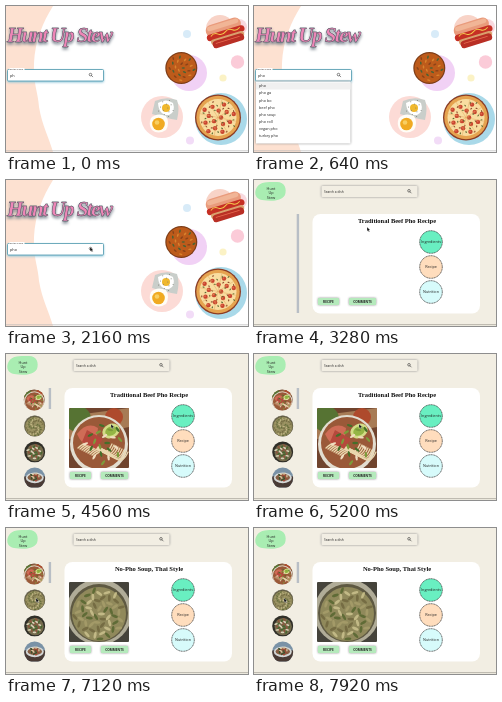
Write an HTML page that moves like this. It is 242 px wide and 146 px high and loops after 8000 ms.

```html
<!DOCTYPE html>
<html lang="en">
<head>
<meta charset="utf-8">
<title>Recipe finder</title>
<style>
html, body { margin: 0; height: 100%; overflow: hidden; background: #fff; }
svg { display: block; width: 100vw; height: 100vh; }
text { font-family: "Open Sans", Arial, sans-serif; font-size: 3.8px; fill: #222; }
.mid { text-anchor: middle; }
.brand {
  font: italic bold 21px "Liberation Serif", serif; letter-spacing: -1.5px;
  fill: #ee86b7; stroke: #555b66; stroke-width: .35px;
  filter: drop-shadow(.6px .9px 0 #59606b) drop-shadow(.6px 2px 1.4px #77808c);
}
.heading { font: bold 6.5px "Liberation Serif", serif; fill: #111; }
.soft { filter: drop-shadow(0 .8px 1px #8a8a8a); }
.glow { filter: drop-shadow(0 1px 1.2px #8cc5d8); }
.tiny { font-size: 3.2px; }
</style>
</head>
<body>
<svg id="stage" viewBox="0 0 242 146" preserveAspectRatio="none"></svg>
<script>
const LOOP = 8000;
const OPEN_RECIPE = 2480, LOGO_TEXT = 3040, PHOTOS = 4000, NEXT_DISH = 7000;

const circle = (x, y, r, fill, more = '') =>
  `<circle cx="${x}" cy="${y}" r="${r}" fill="${fill}" ${more}/>`;
const rect = (x, y, w, h, fill, more = '') =>
  `<rect x="${x}" y="${y}" width="${w}" height="${h}" fill="${fill}" ${more}/>`;
const path = (d, fill, more = '') => `<path d="${d}" fill="${fill}" ${more}/>`;
const line = (d, color, width) =>
  path(d, 'none', `stroke="${color}" stroke-width="${width}" stroke-linecap="round"`);
const text = (x, y, s, more = '') => `<text x="${x}" y="${y}" ${more}>${s}</text>`;
const group = (body, more = '') => `<g ${more}>${body}</g>`;
const repeat = (n, f) => Array.from({ length: n }, (_, i) => f(i)).join('');
const lens = (x, y) =>
  circle(x, y, 1.3, 'none', 'stroke="#333" stroke-width=".6"') +
  line(`M${x + 1} ${y + 1}l1.2 1.2`, '#333', .6);

// Evenly spread points over a disc
function scatter(n, x, y, radius, f) {
  return repeat(n, i => {
    const r = radius * Math.sqrt((i + .5) / n), a = i * 2.4;
    return f(x + r * Math.cos(a), y + r * Math.sin(a), i);
  });
}
const leaf = (x, y, angle, fill, w = 2, h = .8) =>
  `<ellipse rx="${w}" ry="${h}" fill="${fill}" transform="translate(${x} ${y}) rotate(${angle})"/>`;

function hotDog() {
  return circle(214, 23, 14, '#f8d3c7') + circle(233, 21, 8, '#f8d9df') +
    group(
      rect(-20, -11, 39, 13, '#e99b7c', 'rx="6.5"') +
      rect(-18, -9.5, 35, 5, '#f1b596', 'rx="2.5"') +
      rect(-21, -1, 42, 7, '#c62f24', 'rx="3.5"') +
      line('M-16 1q4-3 8 0t8 0t8 0t8 0', '#f3c64c', 1) +
      rect(-18, 5, 37, 6, '#d9a06d', 'rx="3"') +
      rect(-17, 7, 35, 8, '#b92f25', 'rx="4"') +
      line('M-13 10h26', '#e66a4f', 1),
      'transform="translate(219 25) rotate(-17) scale(.93)"');
}

function curry() {
  return circle(183, 67, 18, '#f1d1f5') +
    circle(175.3, 62, 16, '#7d3d18') + circle(175.3, 62, 14.8, '#bd5b1b') +
    scatter(22, 175.3, 62, 13, (x, y, i) =>
      leaf(x, y, i * 67, ['#476335', '#d9822d', '#8b4319'][i % 3], 1.7, .8));
}

function eggs() {
  return circle(156, 111, 21, '#fcdbd6') +
    path('M149 95Q160 90 171 94Q174 102 171 114Q160 112 146 108Z', '#c9ceca') +
    path('M152 97Q160 92 167 97Q170 106 163 109Q153 110 152 97', '#fff') +
    circle(160, 102, 4, '#f0b82d') +
    scatter(12, 160, 102, 9, (x, y) => circle(x, y, .5, '#777b70')) +
    path('M145 112Q151 106 160 110Q164 117 160 124Q152 129 146 124Q142 118 145 112', '#fffdf7') +
    circle(152.5, 118, 6.3, '#f0aa22') + circle(151, 116.5, 2.3, '#f8cf62');
}

function pizza() {
  return circle(215, 113, 26, '#a9d9e9') +
    circle(212, 111.5, 23, '#8c3b23') + circle(212, 111.5, 21.7, '#e5a350') +
    circle(212, 111.5, 18.5, '#f8dda0') +
    scatter(15, 212, 111.5, 17, (x, y) =>
      circle(x, y, 2.2, '#c8452f') + circle(x - .5, y - .5, .9, '#e0694b')) +
    scatter(32, 212.8, 112, 18, (x, y, i) =>
      leaf(x, y, i * 51, i % 2 ? '#596a31' : '#8b4a2c', 1.1, .6)) +
    repeat(4, i => line('M-18 0H18', '#dfa259', .4)
      .replace('/>', ` transform="translate(212 111.5) rotate(${i * 45 + 12})"/>`));
}

const dishNames = ['pho', 'pho ga', 'pho bo', 'beef pho', 'pho soup',
  'pho roll', 'vegan pho', 'turkey pho'];

function searchPage() {
  return rect(0, 0, 242, 146, '#fff') +
    path('M0 0H47C37 16 29 35 28 57C27 77 32 86 33 101C36 119 43 132 47 146H0Z', '#fde1d1') +
    circle(181, 28, 4, '#d8ebf8') + circle(231.5, 56, 6.7, '#fbcbd8') +
    circle(217, 72, 3.6, '#fbf2c5') + circle(184, 134.5, 4, '#f2dcf7') +
    hotDog() + curry() + eggs() + pizza() +
    text(1, 36, 'Hunt Up Stew', 'class="brand"') +
    rect(1.5, 63.5, 96, 11.5, '#fff', 'rx="1" stroke="#4f98ae" stroke-width=".8" class="glow"') +
    rect(3.5, 62, 15, 3, '#fff') +
    text(4, 64.3, 'Enter a dish', 'style="font-size:2.4px"') +
    text(4, 70.5, '', 'id="query"') + lens(84.5, 68.6) +
    group(
      rect(2, 75.5, 94.5, 62, '#fff', 'class="soft"') +
      rect(2, 76.5, 94.5, 7, '#f0f0f0') +
      dishNames.map((s, i) => text(5, 81.2 + i * 7.15, s)).join(''),
      'id="menu"') +
    rect(0, 144.5, 242, .7, '#b8b8b8');
}

// Dish pictures on a 60-unit square
const photos = [
  rect(0, 0, 60, 60, '#70442e') + path('M0 8L60 0V19L0 31Z', '#a77b55') +
    circle(9, 11, 13, '#567333') + circle(45, 9, 9, '#ae4a2c') +
    circle(30, 36, 29, '#e2ddd0') + circle(30, 35, 26, '#9a5938') +
    repeat(9, i => line(`M${9 + i * 2} ${40 + i}q10-10 19 0t15-4`, '#ead7ad', 1.3)) +
    path('M8 26Q18 13 29 20L27 36Q15 42 8 26', '#cf6c56') +
    path('M18 22L34 31L27 41L13 34Z', '#b5493c') +
    leaf(42, 23, -25, '#d2dc87', 9, 7) + leaf(42, 23, -25, '#94b545', 6, 4.5) +
    scatter(20, 35, 35, 20, (x, y, i) =>
      leaf(x, y, i * 73, ['#456f29', '#7c9b3a', '#f0ddc0'][i % 3], 3, 1.2)),
  rect(0, 0, 60, 60, '#45433b') + circle(30, 30, 33, '#b0ac98') +
    circle(30, 31, 29, '#5e5942') + circle(30, 32, 27, '#90895b') +
    scatter(54, 30, 32, 25, (x, y, i) =>
      leaf(x, y, i * 61, ['#c2b986', '#5f6b36', '#a39a68', '#756c43'][i % 4], 3.5, 1.4)),
  rect(0, 0, 60, 60, '#302f28') + circle(31, 32, 24, '#756b4d') +
    scatter(26, 30, 31, 20, (x, y, i) =>
      leaf(x, y, i * 57, ['#47662f', '#d8d0b5', '#8b563c'][i % 3], 5, 2.3)),
  rect(0, 0, 60, 60, '#7a92a6') + rect(0, 26, 60, 34, '#4a3b35') +
    leaf(30, 30, 0, '#d4d7d6', 25, 15) + leaf(30, 29, 0, '#875f43', 20, 10) +
    scatter(14, 30, 28, 12, (x, y, i) =>
      leaf(x, y, i * 49, ['#354f2b', '#d9c6a1', '#a34835'][i % 3], 4, 2))
];

const thumb = (p, i) => group(
  group(p, `transform="translate(${i ? 18 : 17.5} ${35 + i * 26}) scale(.36)"`),
  `clip-path="url(#thumb${i})"`);
const mainPhoto = (p, i) => group(
  group(p, 'transform="translate(63 54)"'), `id="dish${i}" clip-path="url(#photo)"`);

const choice = (y, fill, label) =>
  circle(177, y, 11.3, fill, 'stroke="#222" stroke-width=".7" stroke-dasharray="1.2 .5"') +
  text(177, y + 1.3, label, 'class="mid"');
const button = (x, w, label) =>
  rect(x, 118, w, 7, '#b5eabc', 'rx=".7" class="soft"') +
  text(x + w / 2, 122.7, label, 'class="mid tiny" font-weight="bold"');

function recipePage() {
  return rect(0, 0, 242, 146, '#f2eee3') +
    path('M2 9C5 1 15 2 23 2C31 2 33 9 31 15C27 22 16 21 8 20C2 19 0 14 2 9', '#a9edb2') +
    group(text(17, 9.5, 'Hunt', 'class="mid"') + text(17, 14, 'Up', 'class="mid"') +
      text(17, 18.5, 'Stew', 'class="mid"'), 'id="logoText"') +
    rect(67.5, 6, 96, 11, '#f2eee3', 'rx="1" class="soft"') +
    text(70, 12.6, 'Search a dish', 'class="tiny"') + lens(155, 10.8) +
    rect(58.5, 34, 167.5, 99.5, '#fff', 'rx="8"') +
    text(143, 43.3, '', 'id="heading" class="heading mid"') +
    choice(62, '#69efc1', 'Ingredients') + choice(87, '#ffddbd', 'Recipe') +
    choice(112, '#d7fbfb', 'Nutrition') +
    button(64, 21, 'RECIPE') + button(95, 27, 'COMMENTS') +
    rect(42.7, 34, 2.4, 99, '#b8bec5', 'id="scroll"') +
    group(photos.map(thumb).join(''), 'id="thumbs" clip-path="url(#list)"') +
    photos.slice(0, 2).map(mainPhoto).join('') +
    rect(0, 144.3, 242, .8, '#aaa69d');
}

const stage = document.getElementById('stage');
stage.innerHTML = '<defs>' +
  repeat(4, i => `<clipPath id="thumb${i}">${circle(i ? 28.7 : 28.2, 46 + i * 26, 10.5, '#000')}</clipPath>`) +
  `<clipPath id="photo">${rect(63, 54, 60, 60, '#000', 'rx="1"')}</clipPath>` +
  `<clipPath id="list">${rect(0, 34, 46, 99.5, '#000')}</clipPath></defs>` +
  group(searchPage(), 'id="search"') + group(recipePage(), 'id="recipe"') +
  path('M0 0V4.3L1.1 3.4L1.9 5L2.7 4.6L1.9 3.1H3.2Z', '#111',
    'id="cursor" stroke="#fff" stroke-width=".3"');

const $ = id => document.getElementById(id);
const show = (id, on) => $(id).style.display = on ? '' : 'none';

// time, x, y
const moves = [[0, 84, 67], [800, 84, 67], [1200, 20, 78], [1700, 20, 78],
  [2080, 84, 67], [2640, 84, 67], [2880, 86, 68], [3200, 113, 47],
  [3400, 113, 47], [3680, 105, 70], [5200, 105, 70], [6200, 30, 70], [8000, 30, 70]];

function cursorAt(t) {
  const i = moves.findIndex(m => m[0] > t);
  const [a, b] = [moves[i - 1], moves[i]];
  const p = (t - a[0]) / (b[0] - a[0]), k = p * p * (3 - 2 * p);
  return [a[1] + (b[1] - a[1]) * k, a[2] + (b[2] - a[2]) * k];
}

function draw(t) {
  const next = t >= NEXT_DISH, loaded = t >= PHOTOS;
  show('search', t < OPEN_RECIPE);
  show('recipe', t >= OPEN_RECIPE);
  show('menu', t >= 560 && t < 1760);
  show('logoText', t >= LOGO_TEXT);
  show('thumbs', loaded);
  show('dish0', loaded && !next);
  show('dish1', next);
  show('cursor', t >= 800);
  $('query').textContent = t < 320 ? 'ph' : 'pho';
  $('heading').textContent = next ? 'No-Pho Soup, Thai Style' : 'Traditional Beef Pho Recipe';
  $('scroll').setAttribute('height', loaded ? 21 : 99);
  $('cursor').setAttribute('transform', `translate(${cursorAt(t)})`);
}

const start = performance.now();
function tick() {
  draw((performance.now() - start) % LOOP);
  requestAnimationFrame(tick);
}
tick();
</script>
</body>
</html>
```
